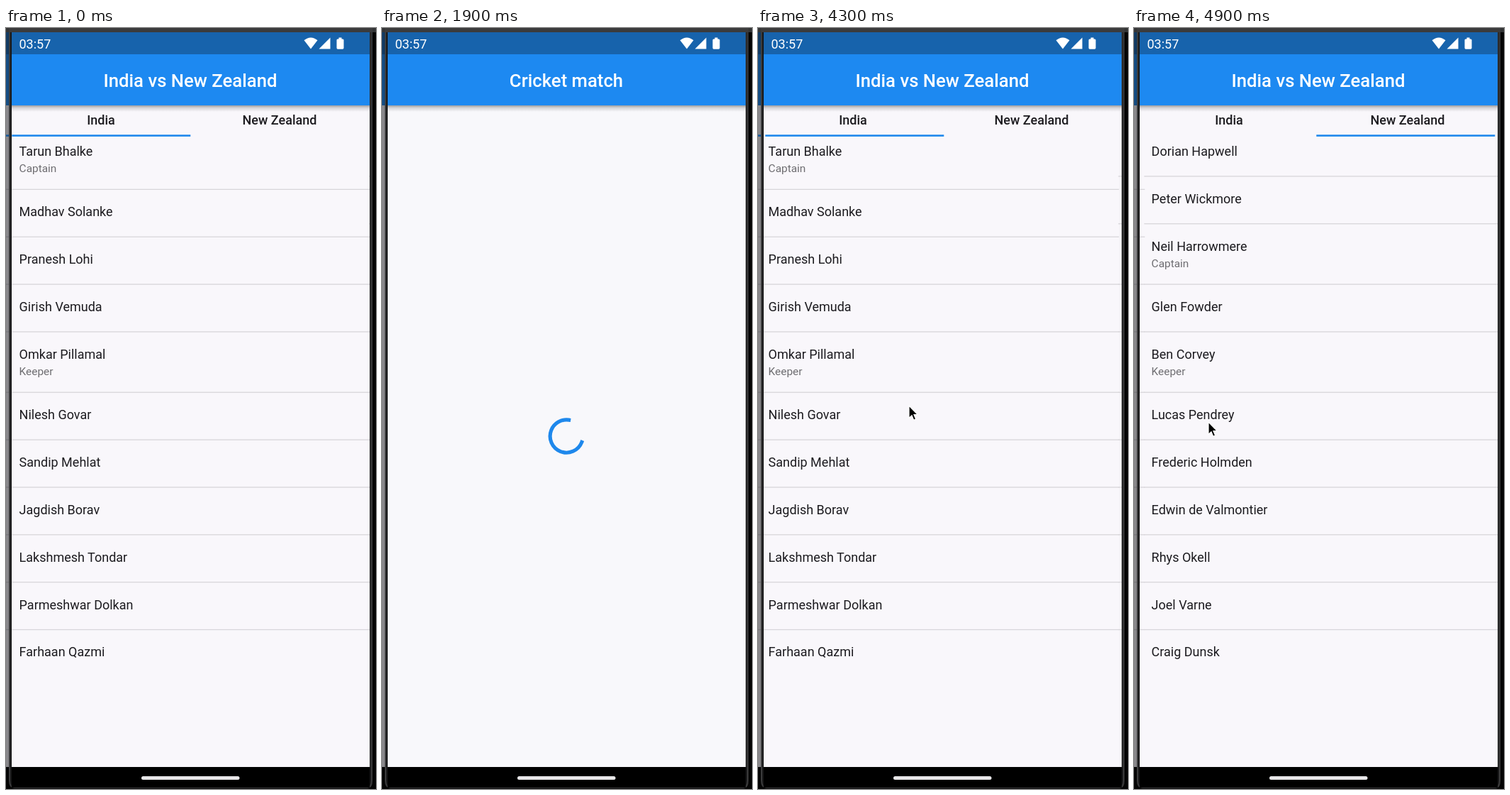
Recreate the animation shown at these times as an HTML page. Size 522x1072 px, loop 5000 ms.

```html
<!DOCTYPE html>
<html lang="en">
<head>
<meta charset="utf-8">
<title>Cricket match</title>
<style>
  html, body { margin: 0; width: 100%; height: 100%; overflow: hidden; background: #000; }
  svg { display: block; width: 522px; height: 1072px; font: 18px Roboto, sans-serif; }
  .name { fill: #1c1b1f; }
  .role { fill: #6e6d71; font-size: 15.43px; }
  .rule { fill: #d8d6da; }
  .medium { font-weight: 500; text-anchor: middle; }
  .title { font-size: 25.7px; fill: #fff; }
</style>
</head>
<body>
<svg viewBox="0 0 522 1072">
  <defs>
    <clipPath id="screen"><rect x="8" y="6" width="505" height="1035"/></clipPath>
    <linearGradient id="shade" x2="0" y2="1">
      <stop offset="0" stop-opacity=".36"/>
      <stop offset=".4" stop-opacity=".14"/>
      <stop offset="1" stop-opacity="0"/>
    </linearGradient>
  </defs>

  <!-- device frame -->
  <rect width="522" height="1072" fill="#050505"/>
  <rect width="522" height="6" fill="#343536"/>
  <rect y="6" width="4" height="31" fill="#123a62"/>
  <rect y="37" width="4" height="72" fill="#154c82"/>
  <rect y="109" width="4" height="932" fill="#89888b"/>
  <g id="edge"></g>
  <path d="M4 0V1060Q4 1071 12 1071H510Q517 1071 517 1060V0Z" fill="#3b3b3c"/>
  <path d="M6 6V1060Q6 1070 13 1070H508Q515 1070 515 1060V6Z" fill="#171718"/>
  <rect x="513" y="6" width="3" height="1035" fill="#2d2d2e"/>
  <rect x="8" y="1041" width="505" height="29" fill="#000"/>
  <rect x="191" y="1054" width="138.500" height="5" rx="2.500" fill="#e7e6e8"/>

  <g clip-path="url(#screen)">
    <rect id="body" x="8" y="109" width="505" height="932"/>
    <g id="match">
      <g id="home"></g>
      <g id="away"></g>
      <rect x="8" y="109" width="505" height="41" fill="#f9f7fb"/>
      <rect id="marker" y="150.300" width="252" height="2.600" fill="#1e88ec"/>
      <text class="medium name" x="134" y="136.400">India</text>
      <text class="medium name" x="386" y="136.400">New Zealand</text>
    </g>
    <circle id="spinner" r="23.140" pathLength="360" fill="none" stroke="#1e88ec"
      stroke-width="5.140" stroke-linecap="square"/>
    <rect x="8" y="109" width="505" height="9" fill="url(#shade)"/>
    <rect x="8" y="6" width="505" height="31" fill="#1763ac"/>
    <rect x="8" y="37" width="505" height="72" fill="#1d89f1"/>
    <text id="title" class="medium title" x="260" y="83"></text>
    <g fill="#fff">
      <text x="18.500" y="28.700">03:57</text>
      <path d="M430 29.500L420.500 17.300Q430 9.600 439.500 17.300Z"/>
      <path d="M441.500 29.500H457.500V13.500Z"/>
      <path d="M469.500 15.500V13.500H473.500V15.500H475Q476.500 15.500 476.500 17V28Q476.500 29.800 475 29.800H468Q466.500 29.800 466.500 28V17Q466.500 15.500 468 15.500Z"/>
    </g>
  </g>
  <path id="cursor" d="M0 0V17.500L4 13.700L6.700 20.200L9.700 18.900L7 12.600H12.200Z"
    fill="#000" stroke="#fff" stroke-width="1.200"/>
</svg>
<script>
const $ = id => document.getElementById(id);
const LOOP = 5000, STEP = 100, PAGE = 504;
const LOAD_START = 1415, LOAD_SHOW = 1500, LOAD_END = 2000;
const RELEASE = 4500;

// A role follows its name after a slash.
const homeTeam = ['Tarun Bhalke/Captain', 'Madhav Solanke', 'Pranesh Lohi', 'Girish Vemuda',
  'Omkar Pillamal/Keeper', 'Nilesh Govar', 'Sandip Mehlat', 'Jagdish Borav',
  'Lakshmesh Tondar', 'Parmeshwar Dolkan', 'Farhaan Qazmi'];
const awayTeam = ['Dorian Hapwell', 'Peter Wickmore', 'Neil Harrowmere/Captain', 'Glen Fowder',
  'Ben Corvey/Keeper', 'Lucas Pendrey', 'Frederic Holmden', 'Edwin de Valmontier',
  'Rhys Okell', 'Joel Varne', 'Craig Dunsk'];

// Time, x, y of the pointer.
const pointerPath = [[3100, 498, 490], [3200, 430, 518], [3300, 368, 526], [3400, 336, 525],
  [3500, 318, 525], [3900, 300, 529], [4100, 268, 530], [4300, 213, 532],
  [4400, 125, 550], [4500, 105, 555], [5000, 105, 555]];
const dragPath = [[0, 0], [4200, 0], [4300, 4], [4400, 92], [4500, 307]];

function teamRows(team) {
  let top = 141.7;
  return team.map((entry, i) => {
    const [name, role] = entry.split('/');
    let row = `<text class="name" x="10.3" y="${top + 38.2}">${name}</text>`;
    if (role) row += `<text class="role" x="10.3" y="${top + 61.3}">${role}</text>`;
    top += role ? 85.3 : 66.86;
    if (i < team.length - 1)
      row += `<rect class="rule" y="${top - .3}" width="${PAGE + 1}" height="1.3"/>`;
    return row;
  }).join('');
}

function along(path, t) {
  const i = path.findIndex(p => p[0] >= t);
  if (i < 1) return path[0].slice(1);
  const a = path[i - 1], b = path[i], k = (t - a[0]) / (b[0] - a[0]);
  return a.slice(1).map((v, j) => v + (b[j + 1] - v) * k);
}

// Cubic easing with control points (.4, 0) and (.2, 1).
function fastOutSlowIn(x) {
  let lo = 0, hi = 1, u;
  for (let i = 0; i < 20; i++) {
    u = (lo + hi) / 2;
    if (1.2 * u * (1 - u) ** 2 + .6 * u * u * (1 - u) + u ** 3 < x) lo = u; else hi = u;
  }
  return 3 * u * u - 2 * u ** 3;
}

function drawSpinner(t) {
  const head = fastOutSlowIn(Math.min(1, t / 666.5));
  const angle = -90 + t * 360 / 2222 + t * 90 / 1333;
  $('spinner').setAttribute('stroke-dasharray', `${Math.max(.1, head * 270)} 360`);
  $('spinner').setAttribute('transform', `translate(260.3 575) rotate(${angle})`);
}

function show(id, visible) {
  $(id).setAttribute('visibility', visible ? 'visible' : 'hidden');
}

function move(id, x, y = 0) {
  $(id).setAttribute('transform', `translate(${x} ${y})`);
}

function draw(t) {
  const loading = t >= LOAD_SHOW && t < LOAD_END;
  show('match', !loading);
  show('spinner', loading);
  show('edge', !loading);
  $('body').setAttribute('fill', loading ? '#f8f8fb' : '#f9f7fb');
  $('title').textContent = loading ? 'Cricket match' : 'India vs New Zealand';
  if (loading) drawSpinner(t - LOAD_START);

  // After release the page settles by exponential decay.
  const scroll = t < RELEASE ? along(dragPath, t)[0]
    : PAGE - 197 * Math.exp((RELEASE - t) / 114.6);
  move('home', 8.3 - scroll);
  move('away', 8.3 - scroll + PAGE);
  move('marker', 8.3 + scroll / 2);
  show('edgeMarker', !loading && scroll < 40);

  show('cursor', t >= pointerPath[0][0]);
  move('cursor', ...along(pointerPath, t));
}

$('home').innerHTML = teamRows(homeTeam);
$('away').innerHTML = teamRows(awayTeam);
$('edge').innerHTML = '<rect id="edgeMarker" y="150.3" width="4" height="2.6" fill="#1a5c9c"/>' +
  [...$('home').querySelectorAll('.rule')].map(r =>
    `<rect y="${r.getAttribute('y')}" width="4" height="1.3" fill="#77767a"/>`).join('');

const start = performance.now();
function tick() {
  const t = (performance.now() - start) % LOOP;
  draw(Math.floor(t / STEP) * STEP);
  requestAnimationFrame(tick);
}
tick();
</script>
</body>
</html>
```
